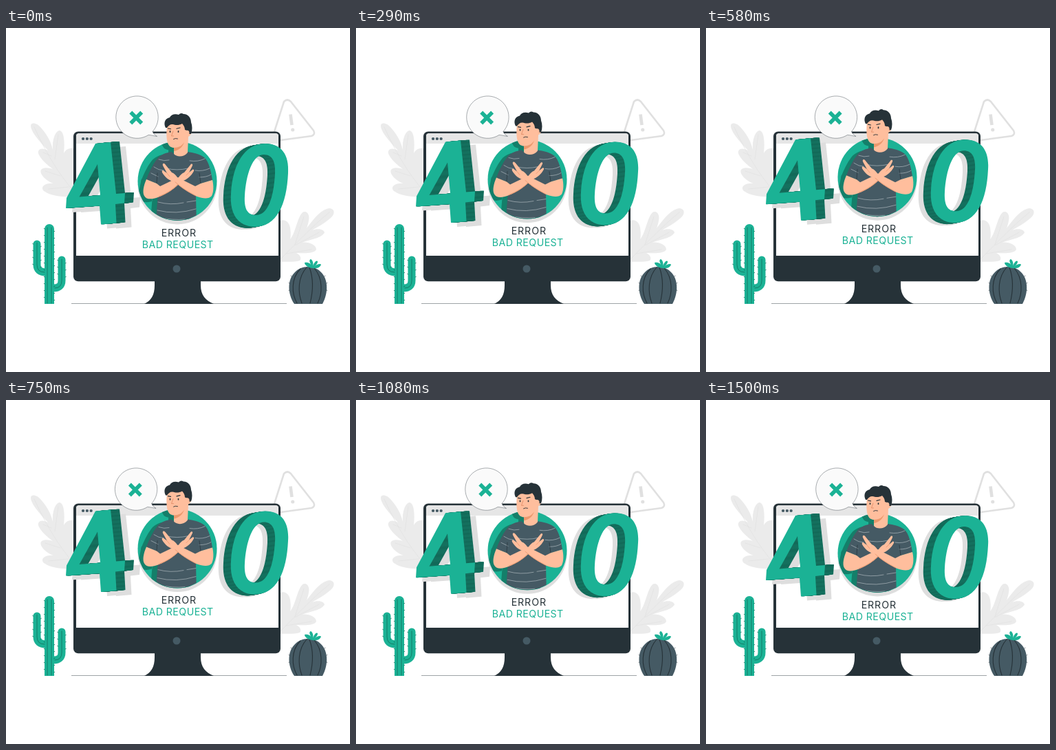
Animation, 500 px wide and 500 px high, one loop 1.54 s. Source, as an HTML page:

```html
<!DOCTYPE html>
<html lang="en">
<head>
<meta charset="utf-8">
<title>400 Bad Request</title>
<style>
  html, body { margin: 0; width: 100%; height: 100%; overflow: hidden; background: #fff; }
  svg { display: block; width: 100vw; height: 100vh; }
  text { font: 400 14.2px Inter, "Open Sans", sans-serif; text-anchor: middle; }
  .line { fill: none; stroke-linecap: round; stroke-linejoin: round; }
  .ink { fill: #263238; }
  .green { fill: #1bb295; }
  .skin { fill: #ffbe9d; }
  .shirt { fill: #455a64; }
</style>
</head>
<body>
<svg viewBox="0 0 500 500">
  <defs>
    <pattern id="hatch" width="5" height="5" patternUnits="userSpaceOnUse" patternTransform="rotate(-38)">
      <rect width="5" height="5" fill="#14705e"/>
      <path d="M0 2H5" stroke="#0f5c4d" stroke-width=".7"/>
    </pattern>
    <clipPath id="disc"><circle cx="249" cy="222.500" r="57.500"/></clipPath>
    <clipPath id="bust"><path d="M180 100H320V222H306.500A57.500 57.500 0 0 1 191.500 222H180Z"/></clipPath>
    <path id="four" fill-rule="evenodd" d="M130 168L152 166L160 241L173 240L172 254.500L159 256L160.500 283.500L138 285.500L136 258.500L87 262L88 247ZM133 198L106.500 245.500L137 243Z"/>
    <path id="zero" fill-rule="evenodd" d="M377 168C400 168 412 184 410 211C408 256 394 289 361 289C336 288 325 269 327 241C329 201 345 168 377 168ZM375 184C358 184 349 213 347 244C346 261 350 272 363 272C381 272 389 246 391 212C392 196 388 184 375 184Z"/>
    <path id="torso" d="M241 180C233 181 224 184 219 191C213 199 208 209 204 220L219 226L221 240L217 290H277L276 243L283 226L300 221C298 208 295 194 288 188C281 183 272 181 264 180C260 187 246 187 241 180Z"/>
    <path id="head" d="M234 142C233 150 233 161 235 167C237 172 240 174 244 174V183C248 188 259 188 264 181L265 158C270 156 271 148 267 146L266 134L248 128L236 133Z"/>
    <path id="hair" d="M232 145C229 139 230 132 238 130C240 126 245 124 251 126C253 124 255 123 258 125C265 125 269 131 269 137C271 142 271 149 269 154H264L263 149L260 148C260 144 258 141 256 139C251 142 246 141 242 140C238 140 236 142 234 145Z"/>
  </defs>

  <!-- leaves -->
  <g fill="#ebebeb">
    <path d="M100 244C84 247 63 244 54 236C50 230 58 225 69 226C56 221 48 211 51 206C54 202 62 203 68 205C58 198 45 185 47 179C49 174 55 175 61 178C52 168 35 151 36 141C38 136 46 139 50 144C58 153 65 163 68 177C67 163 71 151 77 149C84 148 86 165 84 182C87 176 92 174 100 175Z"/>
    <path d="M396 340V282C403 276 411 280 413 290C414 298 414 303 413 307C421 298 423 276 431 268C438 264 442 273 440 280C439 285 438 288 437 291C445 281 456 264 470 262C479 263 478 271 472 276C463 284 453 289 445 294C453 291 461 292 463 297C460 305 441 308 430 312C439 310 451 315 451 322C447 329 430 327 422 327C428 330 430 335 427 338C417 341 406 339 396 340Z"/>
  </g>
  <g class="line" stroke="#e0e0e0" stroke-width=".6">
    <path d="M41 144C55 174 73 209 100 239M54 181L66 186M57 208L79 215M76 155L71 191M62 234L91 231"/>
    <path d="M398 337C420 315 445 288 470 268M433 274L420 315M455 297L420 316M444 322L407 328"/>
  </g>

  <!-- warning sign -->
  <g class="line" stroke="#e0e0e0" stroke-width="2.600">
    <path d="M404 107Q409 102 414 107L447 149Q450 155 444 157L392 164Q386 163 388 157Z"/>
    <path d="M413.500 125.500L415.500 141" stroke-width="4.600" stroke-linecap="butt"/>
    <path d="M416.700 148h.1" stroke-width="5"/>
  </g>

  <!-- monitor -->
  <path d="M95 400.500H408" stroke="#263238" stroke-width=".45"/>
  <path class="ink" d="M216 366H283V374C283 388 290 396 302 401H201C211 396 216 388 216 374Z"/>
  <rect class="ink" x="98" y="150.500" width="301" height="217.700" rx="7"/>
  <path d="M102 331V157Q102 153.300 106 153.300H392Q396 153.300 396 157V331Z" fill="#fff"/>
  <path d="M102 168V157Q102 153.300 106 153.300H392Q396 153.300 396 157V168Z" fill="#e6e6e6"/>
  <path class="line" d="M112 161h.1M117.800 161h.1M123.600 161h.1" stroke="#455a64" stroke-width="4.200"/>
  <circle cx="248" cy="350" r="5.500" fill="#455a64"/>

  <!-- tall cactus -->
  <g class="line" stroke="#1bb295">
    <path d="M45 314V344Q45 355 58 355M81 337V367Q81 378 69 378" stroke-width="11"/>
    <path d="M63 292V390" stroke-width="14"/>
    <path d="M56 388V401H70V388Z" fill="#1bb295" stroke="none"/>
    <g stroke="#13705e" stroke-width=".8">
      <path d="M60 290V400M66 290V400M45 312V344Q45 355 56 355M81 336V367Q81 378 71 378"/>
      <path id="spines"/>
    </g>
  </g>

  <!-- round cactus -->
  <path class="shirt" d="M419 401C409 386 409 366 419 356C429 344 449 344 459 356C469 367 468 387 460 401Z"/>
  <path class="line" d="M437 348C424 362 424 384 430 400M428 350C414 364 415 386 423 400M441 348C447 364 446 384 442 400M448 349C461 364 460 386 453 400" stroke="#263238" stroke-width="1.100"/>
  <path class="line" d="M412 371l-1-.5M412 381l-1 .5M415 361l-1-1M466 371l1-.5M466 381l1 .5M463 361l1-1" stroke="#263238" stroke-width=".6"/>
  <path class="green" d="M445 349C439 348 434 345 434 341C440 340 443 343 445 346C441 341 440 337 443 336C446 338 447 342 446 346C448 341 451 337 453 339C453 343 450 345 448 347C452 343 457 342 458 344C456 349 450 350 445 349Z"/>

  <!-- speech bubble -->
  <g id="bubble">
    <path d="M213 150.500A30.700 30.700 0 1 0 207 155.500C211 155.500 215 157 219.500 157.500C216 155.500 214 153 213 150.500Z" fill="#fafafa" stroke="#263238" stroke-width=".4"/>
    <path d="M181.300 122.500L197.200 138.500M197.200 122.500L181.300 138.500" stroke="#1bb295" stroke-width="5.600"/>
  </g>

  <g id="float">
    <!-- digits -->
    <g fill="#dedede">
      <use href="#four" x="9" y="6"/><use href="#four" x="22" y="6"/>
      <use href="#zero" x="-18" y="4"/><use href="#zero" x="-11" y="4"/>
      <circle cx="249" cy="228" r="57.500"/>
    </g>
    <g id="sides" fill="url(#hatch)"></g>
    <use href="#four" class="green"/>
    <use href="#zero" class="green"/>
    <circle class="green" cx="249" cy="222.500" r="57.500"/>
    <g clip-path="url(#disc)" fill="#147f6a">
      <g transform="translate(-8 3)">
        <use href="#torso"/><use href="#head"/>
        <path d="M205 216L200 240Q202 254 220 249V225Z"/>
      </g>
    </g>

    <!-- man -->
    <g clip-path="url(#bust)">
      <use href="#torso" class="shirt"/>
      <g class="line" stroke="#dfe5e8" stroke-width=".6" opacity=".8">
        <path d="M222 191Q230 194 237 192M267 193Q279 195 289 190M215 202Q222 207 229 207M275 207Q286 209 296 204M233 204Q248 208 265 204M211 211L221 216M281 217Q292 217 298 213"/>
        <path d="M221 253Q239 258 258 254M263 253L276 251M220 265Q247 272 276 263M219 275Q244 280 260 278"/>
      </g>
      <path class="line" d="M220 211L219 226M281 211L283 226" stroke="#263238" stroke-width=".7"/>
    </g>
    <use href="#head" class="skin"/>
    <path d="M244 174C251 174 256 171 259 166C257 173 251 178 244 179Z" fill="#eb996e"/>
    <use href="#hair" class="ink"/>
    <path class="skin" d="M261 150C264 147 267 150 266.500 153C266 156 264 158 261 157Z"/>
    <g class="line" stroke="#263238">
      <path d="M235.500 146L239.500 146.800M248 146.300L253 145" stroke-width="1.200"/>
      <path d="M238.500 150v1.200M250.500 150v1.200" stroke-width="1.700"/>
      <path d="M243.500 161.500Q246 159.800 249.500 161" stroke-width=".9"/>
      <path d="M243 150Q241 155 240.500 157H243.500" stroke="#d87f58" stroke-width=".7"/>
    </g>

    <!-- crossed arms -->
    <path class="skin" d="M204 220C200 229 198 239 201 244C204 250 213 249 221 246C235 241 247 232 255 223C264 220 269 215 273 208C274 206 272 205 271 206L266 210L271 200C272 197 269 197 268 199L259 210C256 211 253 214 251 217L224 230L219 226Z"/>
    <path class="line" d="M222 245Q241 238 252 225" stroke="#eb996e" stroke-width=".9"/>
    <path class="skin" d="M300 221C302 229 302 238 299 244C295 249 286 248 278 245C266 240 253 231 246 224C237 222 231 217 227 210C226 207 228 206 230 208L234 211L228 200C227 196 230 196 232 199L241 210C244 211 247 214 249 217L275 230L283 226Z"/>
    <path class="line" d="M246 224Q257 234 276 244M234 211L238 216M266 210L262 214" stroke="#eb996e" stroke-width=".8"/>

    <text class="ink" x="251.300" y="302.800" letter-spacing=".9">ERROR</text>
    <text class="green" x="249.700" y="319.800" letter-spacing=".45">BAD REQUEST</text>
  </g>
</svg>
<script>
  const LOOP = 1540, RISE = 6.4, PEAK = 735, SNAP = 375, DRIFT = 2.8;
  const byId = id => document.getElementById(id);
  const float = byId("float"), bubble = byId("bubble");

  // stacked copies give a digit its thickness
  const extrude = (id, dx, dy, steps = 13) => Array.from({ length: steps }, (_, i) => {
    const k = 1 - i / steps;
    return `<use href="#${id}" x="${dx * k}" y="${dy * k}"/>`;
  }).join("");
  byId("sides").innerHTML = extrude("four", 13, -1) + extrude("zero", -11, 2);

  // [x, top, bottom, half width] of each cactus column
  const columns = [[63, 292, 396, 7], [45, 314, 344, 5.5], [81, 338, 366, 5.5]];
  byId("spines").setAttribute("d", columns.map(([x, top, end, half]) => {
    let d = "";
    for (let y = top; y <= end; y += 10)
      d += `M${x - half + .5} ${y}l-1.3-.6M${x + half - .5} ${y + 4}l1.3-.6`;
    return d;
  }).join(""));

  function draw(now) {
    const t = now % LOOP;
    const lift = RISE * (1 + Math.cos(2 * Math.PI * (t - PEAK) / LOOP)) / 2;
    // the bubble speeds up to the right, then snaps back
    const u = (t - SNAP + LOOP) % LOOP / LOOP;
    const slide = -1.6 + DRIFT * u * u;
    float.setAttribute("transform", `translate(0 ${-lift})`);
    bubble.setAttribute("transform", `translate(${slide} 0)`);
  }

  const start = performance.now();
  function tick() {
    draw(performance.now() - start);
    requestAnimationFrame(tick);
  }
  tick();
</script>
</body>
</html>
```
